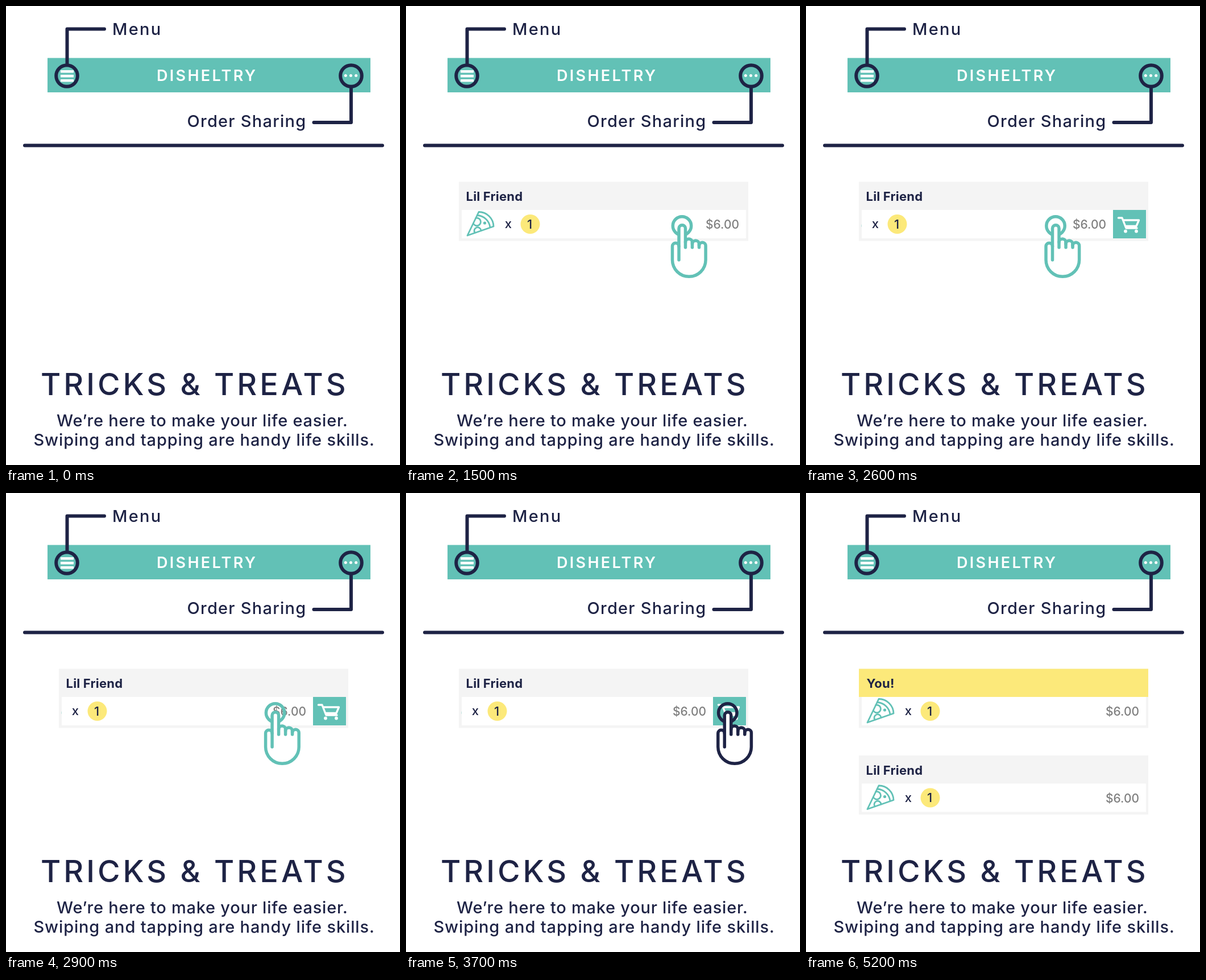
Recreate the animation shown at these times as an HTML page. Size 693x808 px, loop 7200 ms.

```html
<!DOCTYPE html>
<html lang="en">
<head>
<meta charset="utf-8">
<title>Tricks &amp; Treats</title>
<style>
  :root { --navy: #1e2345; --teal: #62c1b6; --yellow: #fce97a; --card: #f4f4f4; }
  html, body { margin: 0; width: 100%; height: 100%; overflow: hidden; background: #fff; }
  svg { display: block; width: 100%; height: 100%; }
  text { font: 500 29px Inter, sans-serif; fill: var(--navy); }
  .line { fill: none; stroke: var(--navy); stroke-width: 6; stroke-linecap: round; stroke-linejoin: round; }
  .teal { fill: var(--teal); }
  .yellow { fill: var(--yellow); }
  .card { fill: var(--card); }
  .white { fill: #fff; }
  .brand { font-size: 27px; font-weight: 600; letter-spacing: 3.3px; fill: #fff; }
  .title { font-size: 54px; letter-spacing: 5px; }
  .name { font-size: 22px; font-weight: 700; letter-spacing: .2px; }
  .count { font-size: 22px; text-anchor: middle; }
  .price { font-size: 21px; fill: #808080; }
  .pizza { fill: none; stroke: var(--teal); stroke-width: 2.8; stroke-linejoin: round; stroke-linecap: round; }
  .cart { fill: none; stroke: #fff; stroke-width: 3.4; stroke-linejoin: round; stroke-linecap: round; }
  .hand { stroke-width: 5.5; stroke-linecap: round; stroke-linejoin: round; }
</style>
</head>
<body>
<svg viewBox="0 0 693 808">
  <defs>
    <clipPath id="rowClip"><rect x="97" y="359" width="501" height="50"/></clipPath>
    <g id="cardBase">
      <rect class="card" x="93" y="309.5" width="509" height="104"/>
      <rect class="white" x="98" y="359" width="500" height="50"/>
    </g>
    <g id="item">
      <g class="pizza">
        <path d="M108 404L128 362.5A26 26 0 0 1 154 388ZM125 368.5A24 24 0 0 1 148 390"/>
        <path d="M122.5 373.5A6.8 6.8 0 1 1 118.5 383M121 399A6 6 0 1 1 132 395.5"/>
        <circle class="teal" cx="138.5" cy="382" r="1.2"/>
      </g>
      <text class="count" x="180" y="391">x</text>
      <circle class="yellow" cx="218.5" cy="384" r="17"/>
      <text class="count" x="217.5" y="391.5">1</text>
      <text class="price" x="527" y="392">$6.00</text>
    </g>
    <g id="friendHead"><use href="#cardBase"/><text class="name" x="105.5" y="343">Lil Friend</text></g>
  </defs>

  <rect class="teal" x="73" y="91.5" width="568" height="60.5"/>
  <path d="M96 115.3h23M96 123.3h23M96 131.2h23" stroke="#fff" stroke-width="4.6"/>
  <g class="white">
    <circle cx="597.3" cy="122.5" r="2.5"/><circle cx="606.5" cy="122.5" r="2.5"/><circle cx="615.7" cy="122.5" r="2.5"/>
  </g>
  <g class="line">
    <circle cx="107" cy="123" r="18.8"/>
    <circle cx="607" cy="123" r="18.8"/>
    <path d="M107.5 103V40.5H173M607 143V205H541.5M33 245.5H662"/>
  </g>
  <text class="brand" x="265" y="132">DISHELTRY</text>
  <text x="187" y="51" letter-spacing="2.3">Menu</text>
  <text x="318.5" y="212.5" letter-spacing="1.25">Order Sharing</text>
  <text class="title" x="61" y="685">TRICKS &amp; TREATS</text>
  <text x="89" y="739.5" letter-spacing=".75">We’re here to make your life easier.</text>
  <text x="48.5" y="774" letter-spacing=".85">Swiping and tapping are handy life skills.</text>

  <g id="swipe">
    <use href="#friendHead"/>
    <g clip-path="url(#rowClip)">
      <use id="row" href="#item"/>
      <rect id="action" class="teal" x="598" y="359" width="58" height="50"/>
    </g>
    <g id="cart">
      <path class="cart" d="M549.5 373H556L563 391H582M558 377H585.5L581 387.5H562"/>
      <circle class="white" cx="562" cy="396.5" r="2.9"/><circle class="white" cx="581" cy="396.5" r="2.9"/>
    </g>
    <g id="hand" class="hand">
      <circle id="ring" r="16.2"/>
      <path class="white" d="M-17 60V36a5.75 5.75 0 0 1 11.5 0V4.5a5.75 5.75 0 0 1 11.5 0V29a6 6 0 0 1 12 0V32a6 6 0 0 1 12 0V35a5.8 5.8 0 0 1 11.6 0V60A29.3 29.3 0 0 1 -17 60Z"/>
      <path fill="none" d="M-5.5 36V60M6 28V38M18 29V38M30 32V38"/>
    </g>
  </g>

  <g id="result">
    <use href="#cardBase"/>
    <rect class="yellow" x="93" y="309.5" width="509" height="49.5"/>
    <text class="name" x="106.5" y="343">You!</text>
    <use href="#item"/>
    <g transform="translate(0 152.5)"><use href="#friendHead"/><use href="#item"/></g>
  </g>
</svg>
<script>
  const LOOP = 7200, STEP = 100, DRAWER = 58, HAND_X = 485.5, CART_X = 565.8;
  const [swipe, row, action, cart, hand, ring, result] =
    ['swipe', 'row', 'action', 'cart', 'hand', 'ring', 'result'].map(id => document.getElementById(id));

  const show = (el, visible) => el.setAttribute('display', visible ? 'inline' : 'none');
  const move = (el, x, y = 0) => el.setAttribute('transform', `translate(${x} ${y})`);
  const progress = (t, from, to) => Math.min(1, Math.max(0, (t - from) / (to - from)));

  function draw(time) {
    const t = Math.floor((time % LOOP) / STEP) * STEP;
    const slide = -DRAWER * progress(t, 1500, 2100) ** 1.25;
    const back = progress(t, 2500, 3700);

    show(swipe, t >= 500 && t < 5200);
    show(result, t >= 5200);
    show(hand, t >= 1500);
    show(cart, t >= 2100);
    move(row, slide);
    move(action, slide);
    move(hand, HAND_X + slide + back * (CART_X - HAND_X + DRAWER), 387);

    hand.setAttribute('stroke', t >= 3700 ? 'var(--navy)' : 'var(--teal)');
    ring.setAttribute('fill', t >= 4200 && t < 4700 ? 'var(--yellow)' : 'none');
  }

  const start = performance.now();
  function tick() {
    draw(performance.now() - start);
    requestAnimationFrame(tick);
  }
  tick();
</script>
</body>
</html>
```
